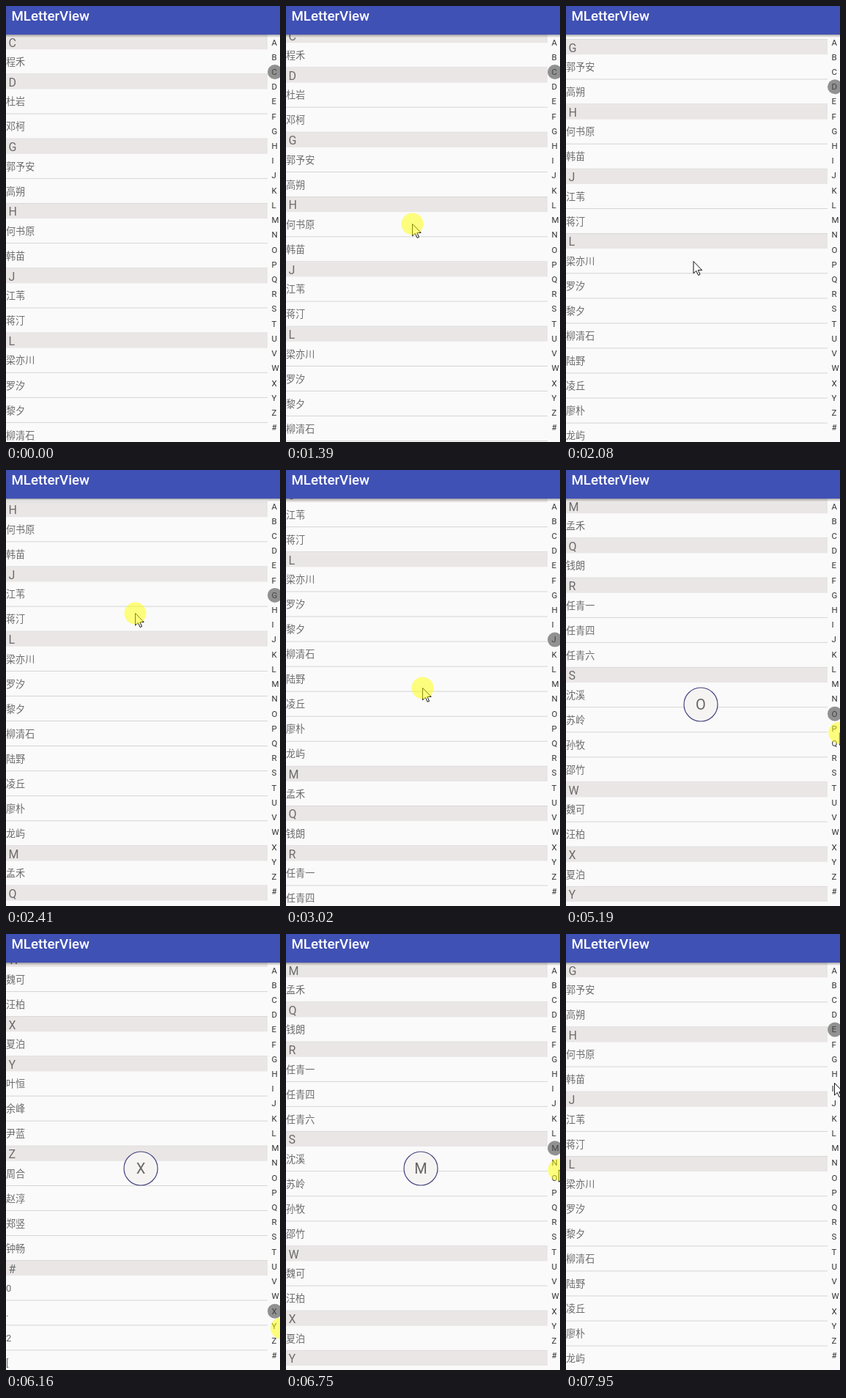
These frames come from a looping animation (374 by 595 pixels, 8 s). An HTML page with a canvas:

```html
<!DOCTYPE html>
<html lang="zh">
<head>
<meta charset="utf-8">
<title>MLetterView</title>
<style>
  html, body { margin: 0; width: 100%; height: 100%; overflow: hidden; background: #fafafa; }
  canvas { display: block; }
</style>
</head>
<body>
<canvas id="stage" width="374" height="595"></canvas>
<script>
const ctx = document.getElementById('stage').getContext('2d');
const LOOP = 8000, WIDTH = 374, HEIGHT = 595;
const TOP = 39, LIST_WIDTH = 357, HEADER = 20.2, ROW = 34.05;
const MAX_SCROLL = 1101.6, LETTER_STEP = 20.22;
const LETTERS = 'ABCDEFGHIJKLMNOPQRSTUVWXYZ#';
const FONT = 'Roboto, "Noto Sans CJK SC", "Noto Sans CJK", sans-serif';

const groups = {
  C: '程禾', D: '杜岩 邓柯', G: '郭予安 高朔', H: '何书原 韩苗', J: '江苇 蒋汀',
  L: '梁亦川 罗汐 黎夕 柳清石 陆野 凌丘 廖朴 龙屿', M: '孟禾', Q: '钱朗',
  R: '任青一 任青四 任青六', S: '沈溪 苏岭 孙牧 邵竹', W: '魏可 汪柏', X: '夏泊',
  Y: '叶恒 余峰 尹蓝', Z: '周合 赵淳 郑竖 钟畅', '#': '0 . 2 ['
};
let offset = 0;
const sections = Object.entries(groups).map(([letter, names]) => {
  const section = { letter, index: LETTERS.indexOf(letter), rows: names.split(' '), top: offset };
  offset += HEADER + section.rows.length * ROW;
  return section;
});

// The list is flicked three times at a steady beat, then the index is dragged down and up
const FLICK_START = 1230, FLICK_BEAT = 815, FLICK_END = 3390;
const FLICK_DISTANCES = [135.5, 188, 165];
const INDEX_START = 4680, TURN = 6300, INDEX_END = 7460;

const clamp = (v, min = 0, max = 1) => Math.max(min, Math.min(max, v));
const mix = (a, b, p) => a + (b - a) * p;
const linear = p => p;
const easeOut = p => Math.sin(p * Math.PI / 2);
const smooth = p => p * p * (3 - 2 * p);

const glides = [
  { start: 360, end: 1160, from: [327, 596], to: [178, 298] },
  { start: FLICK_END, end: 3890, from: [188, 225], to: [375, 345], ease: easeOut },
  { start: 4270, end: 4320, from: [375, 272], to: [371.5, 272] },
  { start: 4724, end: TURN, from: [371.5, 272], to: [376, 563] },
  { start: TURN, end: 7080, from: [376, 563], to: [369, 145] },
  { start: 7690, end: 7950, from: [369, 145], to: [366, 203] }
];

function pointerAt(t) {
  if (t > 1160 && t < FLICK_END) {
    const angle = (t - FLICK_START) / FLICK_BEAT * Math.PI * 2;
    const drift = clamp((t - FLICK_START) / 1790, 0, 1.1);
    return [172 + 14 * drift ** 3, 271 + 80 * Math.cos(angle)];
  }
  const { start, end, from, to, ease = linear } = glides.findLast(g => t >= g.start) || glides[0];
  const p = ease(clamp((t - start) / (end - start)));
  return from.map((v, i) => mix(v, to[i], p));
}

function isPressed(t) {
  if (t >= INDEX_START) return t < INDEX_END + 40;
  const phase = (t - FLICK_START) % FLICK_BEAT;
  return t < FLICK_END && phase > 60 && phase < 450;
}

function flickScroll(t) {
  return FLICK_DISTANCES.reduce((sum, distance, i) => {
    const phase = t - FLICK_START - i * FLICK_BEAT;
    return sum + distance * smooth(clamp((phase - 64) / 620));
  }, 0);
}

function listState(t, pointerY) {
  const scroll = flickScroll(t);
  if (t < INDEX_START) {
    return { scroll, selected: sections.findLast(s => s.top <= scroll).index };
  }
  const y = t < INDEX_END ? pointerY : 145;
  const selected = clamp(Math.floor((y - 39.4) / 20.2) - 1, 0, 26);
  // Letters without a section keep the last section that was passed
  const section = t < TURN
    ? sections.findLast(s => s.index <= selected)
    : sections.find(s => s.index >= selected);
  const untouched = t < TURN && section.top < scroll - ROW * 3;
  return { scroll: untouched ? scroll : Math.min(section.top, MAX_SCROLL), selected };
}

function text(str, x, y, size, color, weight = 400, align = 'left') {
  ctx.font = `${weight} ${size}px ${FONT}`;
  ctx.fillStyle = color;
  ctx.textAlign = align;
  ctx.fillText(str, x, y);
}

function rect(x, y, w, h, color) {
  ctx.fillStyle = color;
  ctx.fillRect(x, y, w, h);
}

function disc(x, y, r, color) {
  ctx.beginPath();
  ctx.arc(x, y, r, 0, Math.PI * 2);
  ctx.fillStyle = color;
  ctx.fill();
}

function drawList(scroll) {
  for (const section of sections) {
    let y = TOP + section.top - scroll;
    rect(0, y, LIST_WIDTH, HEADER, '#e9e6e5');
    text(section.letter, 3.5, y + 16.5, 16, '#6c6c6c');
    y += HEADER;
    for (const name of section.rows) {
      text(name, 0, y + 21.8, 13.1, '#6c6c6c');
      y += ROW;
      rect(0, y - 0.9, LIST_WIDTH, 1, '#d6d5d5');
    }
  }
}

function drawIndex(selected) {
  disc(367, 49.6 + selected * LETTER_STEP, 10, '#919191');
  [...LETTERS].forEach((letter, i) =>
    text(letter, 362.5, 53.5 + i * LETTER_STEP, 11.5, i === selected ? '#444' : '#333'));
}

function drawToolbar() {
  const shadow = ctx.createLinearGradient(0, TOP, 0, TOP + 4);
  shadow.addColorStop(0, 'rgba(0,0,0,.32)');
  shadow.addColorStop(1, 'rgba(0,0,0,0)');
  rect(0, TOP, WIDTH, 4, shadow);
  rect(0, 0, WIDTH, TOP, '#4051b5');
  text('MLetterView', 7.5, 20.3, 18.7, '#fff', 500);
}

function drawBubble(letter) {
  disc(184, 320, 23, '#f6f3f3');
  ctx.strokeStyle = '#45457f';
  ctx.lineWidth = 1.2;
  ctx.stroke();
  text(letter, 184, 327.3, 20, '#666', 400, 'center');
}

const arrow = new Path2D('M0 0V16.5L3.8 12.9L6.6 19L9 18L6.3 12H11.6Z');

function drawPointer(x, y, pressed) {
  ctx.save();
  ctx.translate(x + 0.5, y + 0.5);
  ctx.fillStyle = '#fff';
  ctx.fill(arrow);
  ctx.strokeStyle = '#111';
  ctx.lineWidth = 1;
  ctx.stroke(arrow);
  // The press highlight tints the arrow as well
  if (pressed) disc(0, 0, 15, 'rgba(255,255,0,.5)');
  ctx.restore();
}

function draw(now) {
  const t = now % LOOP;
  const [x, y] = pointerAt(t);
  const { scroll, selected } = listState(t, y);
  rect(0, 0, WIDTH, HEIGHT, '#fafafa');
  drawList(scroll);
  drawIndex(selected);
  drawToolbar();
  if (t >= INDEX_START && t < INDEX_END) drawBubble(LETTERS[selected]);
  drawPointer(x, y, isPressed(t));
  requestAnimationFrame(draw);
}
requestAnimationFrame(draw);
</script>
</body>
</html>
```
